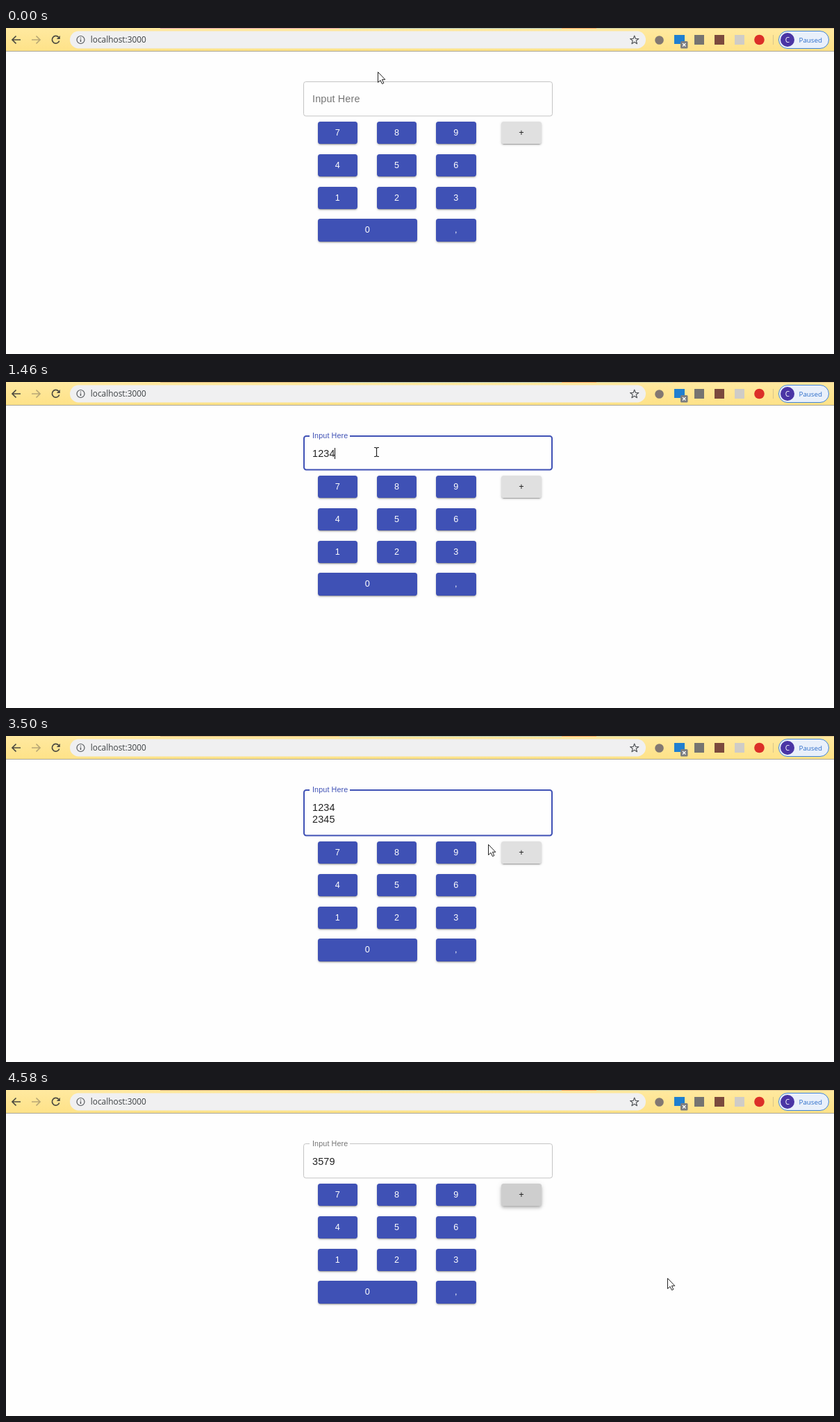
Animation, 1192 px wide and 470 px high, one loop 4630 ms. Source, as an HTML page:

```html
<!DOCTYPE html>
<html lang="en">
<head>
<meta charset="utf-8">
<title>Keypad adder</title>
<style>
  html, body { margin: 0; width: 100%; height: 100%; overflow: hidden; background: #fefefe; }
  svg { position: absolute; left: 0; top: 0; }
  text { white-space: pre; }
  .ui { font-family: "Open Sans", "Noto Sans", sans-serif; }
  .field, .key { font-family: "Liberation Sans", Arial, sans-serif; }
  .field { font-size: 14.4px; letter-spacing: .00938em; }
  #pad { position: absolute; left: 0; top: 0; }
  .key {
    position: absolute; height: 32.4px; border-radius: 3.6px; overflow: hidden;
    background: #3f51b5; color: #fff; font-size: 12.6px; letter-spacing: .02857em;
    line-height: 32.4px; text-align: center;
    box-shadow: 0 2.7px .9px -1.8px rgba(0,0,0,.2), 0 1.8px 1.8px rgba(0,0,0,.14), 0 .9px 4.5px rgba(0,0,0,.12);
  }
  .key.plus { background: #e0e0e0; color: rgba(0,0,0,.87); }
  .key.plus.raised {
    box-shadow: 0 1.8px 3.6px -.9px rgba(0,0,0,.2), 0 3.6px 4.5px rgba(0,0,0,.14), 0 .9px 9px rgba(0,0,0,.12);
  }
  #ripple { position: absolute; border-radius: 50%; background: #000; }
</style>
</head>
<body>
<svg width="1192" height="470" viewBox="0 0 1192 470">
  <defs>
    <linearGradient id="bar" x2="0" y2="1">
      <stop stop-color="#ffe9a0"/><stop offset="1" stop-color="#fee288"/>
    </linearGradient>
  </defs>
  <!-- browser bar -->
  <rect width="1192" height="33" fill="url(#bar)"/>
  <path d="M0 33.5H1192" stroke="#a9a698"/>
  <g stroke-width="1" opacity=".75">
    <path id="strip" d="M222 .5H480"/>
    <path d="M480 .5H800" stroke="#8fb5c4"/>
    <path d="M800 .5H850" stroke="#e98b55"/>
    <path d="M850 .5H960" stroke="#b5bfa4"/>
    <path d="M960 .5H1192" stroke="#d8b583"/>
  </g>
  <rect x="92" y="4.5" width="829" height="25" rx="12.5" fill="#f0f0f1"/>
  <g fill="none" stroke="#4c4a40" stroke-width="1.7">
    <path d="M21 17H9.5M14.5 11.5L9 17L14.5 22.5"/>
    <path d="M37 17H48.500M43.500 11.500L49 17L43.500 22.500" stroke="#b8a775"/>
    <path d="M75.700 13.300A5.300 5.300 0 1 0 76.700 18.500"/>
    <path d="M77.800 11V16H72.800Z" fill="#4c4a40" stroke="none"/>
  </g>
  <g fill="none" stroke="#55585c" stroke-width="1.2">
    <circle cx="107.500" cy="17" r="5.500"/>
    <path d="M107.500 16.300V20M107.500 13.700V15" stroke-width="1.400"/>
    <path id="star" stroke-linejoin="round"/>
  </g>
  <text class="ui" x="121.700" y="21.200" font-size="11.900" fill="#3c4043">localhost:3000</text>
  <circle cx="940.500" cy="17.500" r="6.300" fill="#827872"/>
  <rect x="962" y="10" width="15" height="13" fill="#1f7fd0"/>
  <rect x="971" y="19" width="10.500" height="10.500" rx="1.500" fill="#7b7d80"/>
  <path d="M974 22L978.500 26.500M978.500 22L974 26.500" stroke="#fff" stroke-width="1.300"/>
  <rect x="991" y="10" width="14" height="14" fill="#757471"/>
  <rect x="1020" y="10" width="14" height="14" fill="#7b4a3d"/>
  <rect x="1049" y="10" width="14" height="14" fill="#cfccc7"/>
  <circle cx="1084.500" cy="17" r="7.300" fill="#dc2f28"/>
  <path d="M1104.500 10V24" stroke="#d9c58a"/>
  <rect x="1112.500" y="4.500" width="72" height="25" rx="12.500" fill="#e9f0fb" stroke="#3f83d8"/>
  <circle cx="1125" cy="17" r="10" fill="#4a35a5"/>
  <text class="ui" x="1125" y="20.600" font-size="10" fill="#fff" text-anchor="middle">C</text>
  <text class="ui" x="1141.500" y="20.700" font-size="9.800" fill="#2b6cc9">Paused</text>

  <!-- text field -->
  <path id="outline" fill="none"/>
  <text id="label" class="field">Input Here</text>
  <text id="line0" class="field" x="441" y="108" fill="#212121"></text>
  <text id="line1" class="field" x="441" y="125" fill="#212121"></text>
  <rect id="caret" width="1" height="16" fill="#111"/>
</svg>
<div id="pad"></div>
<svg width="1192" height="470" viewBox="0 0 1192 470">
  <g id="pointer">
    <path id="arrow" d="M.5 .5V15.500L4 12.300L6.500 17.500L8.800 16.500L6.400 11.300H10.800Z" fill="#fff" stroke="#222" stroke-linejoin="round"/>
    <path id="beam" d="M-3 -6.500H-.8L.5 -5.500L1.800 -6.500H4M.5 -5.500V5.500M-3 6.500H-.8L.5 5.500L1.800 6.500H4" fill="none" stroke="#222" stroke-width="1.200"/>
    <g id="hand" stroke="#222" stroke-width="1.100" stroke-linejoin="round">
      <path d="M-2 12V1.500Q-2 0 -.4 0T1.200 1.500V7Q2.700 6 4 7.500Q5.600 6.800 6.600 8.200Q8.600 7.800 8.800 10V14Q8.800 16.500 7 18.500V21H-1.500V19Q-4 16 -6 12.500Q-6.500 10.500 -4.500 10.500Z" fill="#fff"/>
      <path d="M1.200 7V11M4 7.500V11M6.600 8.200V11" fill="none"/>
    </g>
  </g>
</svg>
<script>
const LOOP = 4630, FOCUS = 360, PRESS = 4120, SUM = 4212, HOVER = 3765;
const $ = id => document.getElementById(id);
const clamp = v => Math.max(0, Math.min(1, v));
const mix = (a, b, p) => a + (b - a) * p;
const rgb = (a, b, p) => `rgb(${a.map((v, i) => Math.round(mix(v, b[i], p)))})`;
const easeOut = u => 1 - (1 - u) ** 3;
const between = (t, a, b) => t >= a && t < b;

const GREY = [117, 117, 117], BLUE = [63, 81, 181], DARK = [33, 33, 33];

// Screen refreshes: [from, to, steps]; the picture rests in between.
const BURSTS = [
  [0, 30, 1], [30, 90, 1], [90, 540, 9], [540, 590, 1], [3270, 3500, 5],
  [3500, 3780, 5], [3780, 3830, 1], [3830, 3970, 3], [4120, 4580, 10]
];
// Pointer path: [time, x, y]
const PATH = [
  [30, 535, 63], [250, 533, 101], [3270, 533, 101], [3500, 694, 156], [3720, 711, 158],
  [3780, 724, 160], [3900, 732, 161], [4260, 732, 161], [4420, 860, 225], [4580, 952, 271]
];

function refreshTime(t) {
  const [a, b, n] = BURSTS.findLast(s => s[0] <= t);
  return a + Math.floor(clamp((t - a) / (b - a)) * n + 1e-6) / n * (b - a);
}

function pointerAt(t) {
  const i = PATH.findIndex(k => k[0] > t);
  if (i === 0) return PATH[0].slice(1);
  if (i < 0) return PATH[PATH.length - 1].slice(1);
  const [a, b] = [PATH[i - 1], PATH[i]], u = (t - a[0]) / (b[0] - a[0]);
  return [mix(a[1], b[1], u), mix(a[2], b[2], u)];
}

function addKey(text, x, row, width = 57.6) {
  const key = document.createElement("div");
  key.className = "key";
  key.textContent = text;
  key.style.cssText = `left:${x}px;top:${134.9 + row * 46.8}px;width:${width}px`;
  $("pad").append(key);
  return key;
}

const COLS = [448.7, 533.9, 619.2];
["789", "456", "123"].forEach((keys, row) => [...keys].forEach((k, i) => addKey(k, COLS[i], row)));
addKey("0", COLS[0], 3, 143.6);
addKey(",", COLS[2], 3);
const plus = addKey("+", 713.4, 0);
plus.classList.add("plus");
const ripple = document.createElement("div");
ripple.id = "ripple";
plus.append(ripple);

$("star").setAttribute("d", "M" + Array.from({ length: 10 }, (_, i) => {
  const r = i % 2 ? 2.7 : 6.4, a = i * Math.PI / 5;
  return `${904.7 + r * Math.sin(a)} ${17.5 - r * Math.cos(a)}`;
}).join("L") + "Z");

function setAttrs(id, attrs) {
  for (const k in attrs) $(id).setAttribute(k, attrs[k]);
}

function outlinePath(height, w, gap) {
  const l = 428 + w / 2, r = 787 - w / 2, t = 77 + w / 2, b = 77 + height - w / 2, c = 3.2;
  return `M${466 + gap / 2} ${t}H${r - c}a${c} ${c} 0 0 1 ${c} ${c}V${b - c}a${c} ${c} 0 0 1 ${-c} ${c}` +
    `H${l + c}a${c} ${c} 0 0 1 ${-c} ${-c}V${t + c}a${c} ${c} 0 0 1 ${c} ${-c}H${466 - gap / 2}`;
}

function typed(t) {
  if (t < 1460) return [""];
  if (t >= SUM) return ["3579"];
  if (t < 1970) return ["1234"];
  const n = t < 2480 ? 0 : Math.min(4, 1 + Math.floor((t - 2479) / 76.6));
  return ["1234", "2345".slice(0, n)];
}

function drawField(t, s, lines, height, hovered) {
  const p = easeOut(clamp((s - FOCUS) / 200)), blur = clamp((s - PRESS) / 200);
  const focused = s >= FOCUS && s < PRESS;
  setAttrs("outline", {
    d: outlinePath(height, focused ? 2 : 1, 58 * p),
    "stroke-width": focused ? 2 : 1,
    stroke: focused ? rgb(DARK, BLUE, p) : hovered ? "#212121" : "#c4c4c4"
  });
  setAttrs("label", {
    transform: `translate(441 ${mix(107, 81, p)}) scale(${mix(1, .75, p)})`,
    fill: rgb(GREY, BLUE, p * (1 - blur))
  });
  $("line0").textContent = lines[0];
  $("line1").textContent = lines[1] || "";
  const last = lines.length - 1;
  setAttrs("caret", {
    x: lines[last] ? 441 + Math.round(lines[last].length * 8.1) : 441,
    y: 95 + last * 17,
    visibility: between(s, FOCUS, 900) && t < 900 || between(t, 1460, 3270) || between(t, 3780, PRESS)
      ? "visible" : "hidden"
  });
}

function drawPlus(s) {
  const hover = clamp((s - HOVER) / 200), held = clamp((s - PRESS) / 300);
  const level = Math.round(224 - 11 * hover - 7 * held);
  plus.style.backgroundColor = `rgb(${level},${level},${level})`;
  plus.classList.toggle("raised", s >= HOVER);
  const r = 48 * easeOut(clamp((s - PRESS) / 300));
  ripple.style.cssText = `left:${18.6 - r}px;top:${16 - r}px;width:${2 * r}px;height:${2 * r}px;` +
    `opacity:${.12 * (1 - clamp((s - 4250) / 300))}`;
}

function draw(t) {
  const s = refreshTime(t), lines = typed(t), shift = (lines.length - 1) * 17;
  const height = 50.4 + shift, [x, y] = pointerAt(s);
  const inField = x > 428 && x < 787 && y > 77 && y < 77 + height;
  const onPlus = x > 713.4 && x < 771 && y > 134.9 + shift && y < 167.3 + shift;
  const kind = inField ? "beam" : onPlus ? "hand" : "arrow";
  for (const id of ["arrow", "beam", "hand"]) $(id).style.display = id === kind ? "" : "none";
  $("pointer").setAttribute("transform", `translate(${Math.round(x)} ${Math.round(y)})`);
  $("strip").setAttribute("stroke", t < 30 ? "#d98bab" : "#cfa578");
  $("pad").style.top = shift + "px";
  drawField(t, s, lines, height, inField);
  drawPlus(s);
}

const start = performance.now();
function tick() {
  draw((performance.now() - start) % LOOP);
  requestAnimationFrame(tick);
}
tick();
</script>
</body>
</html>
```
